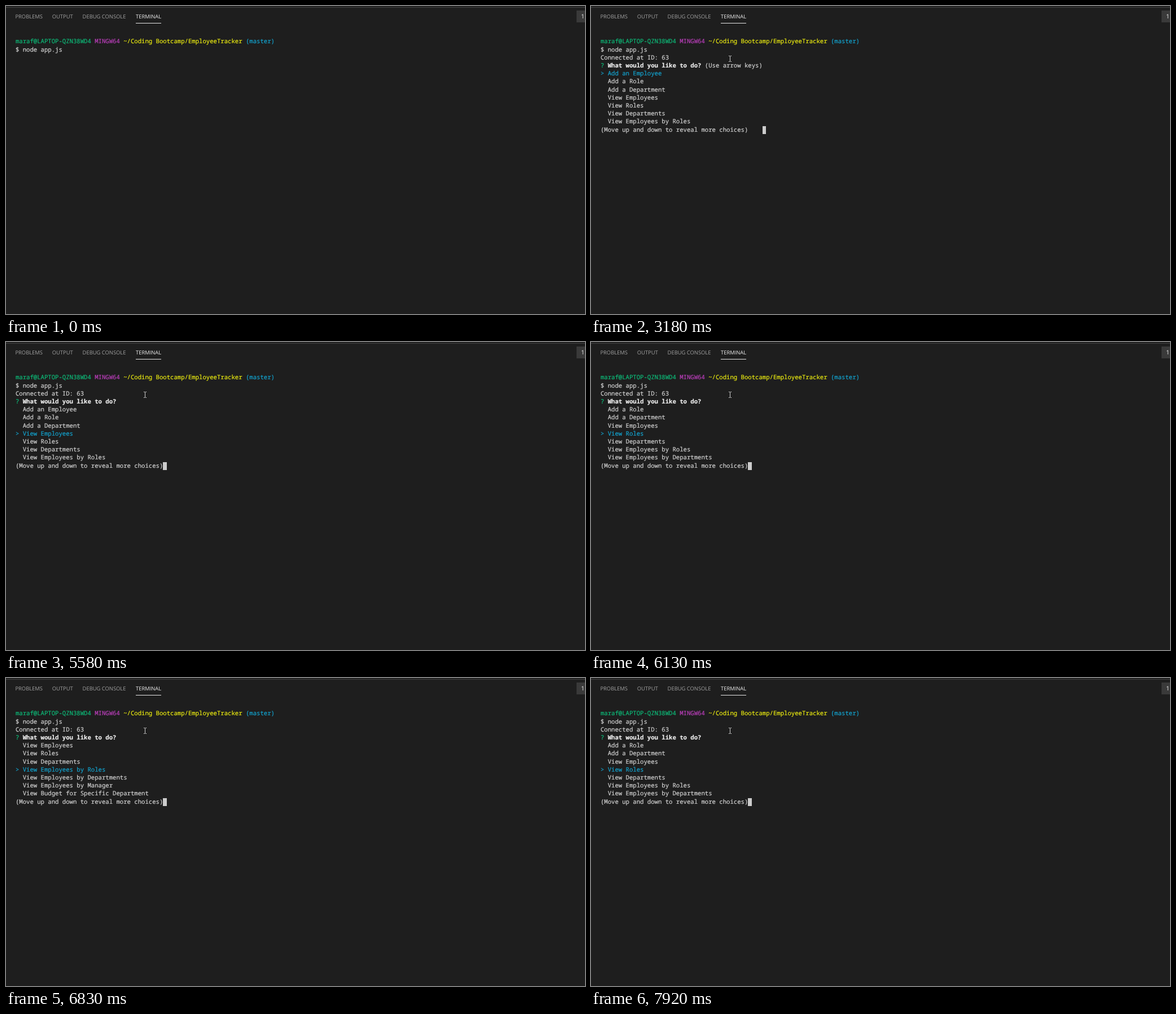
An HTML page that plays this animation: 1026x546 px, repeating every 8 s.

```html
<!DOCTYPE html>
<html lang="en">
<head>
<meta charset="utf-8">
<title>Terminal menu</title>
<style>
  html, body { margin: 0; width: 100%; height: 100%; overflow: hidden; background: #1e1e1e; }
  body { position: relative; text-rendering: geometricPrecision; }
  body > * { position: absolute; }
  .rule { left: 0; top: 2px; width: 100%; height: 1px; background: #434343; }
  .tab { top: 12px; height: 18px; line-height: 13px; white-space: nowrap; color: #a2a2a2;
    font-family: "Open Sans", "Noto Sans", sans-serif; font-size: 9.4px; }
  .active { color: #efefef; }
  .active::after { content: ""; position: absolute; left: 0; top: 18px; width: 100%; height: 1px; background: #e7e7e7; }
  .picker { left: 1011px; top: 8px; width: 15px; height: 21px; box-sizing: border-box; padding-left: 8px;
    background: #3a3a3a; color: #f0f0f0; font: 10.5px/22px "Open Sans", "Noto Sans", sans-serif; overflow: hidden; }
  pre { left: 17px; top: 56.45px; margin: 0; color: #d2d2d2; -webkit-text-stroke: .2px;
    font: 10.63px/14.18px "Noto Sans Mono", "DejaVu Sans Mono", monospace; font-variant-ligatures: none; }
  b { color: #ececec; }
  .green { color: #0dbc79; }
  .magenta { color: #bc3fbc; }
  .yellow { color: #ecec10; }
  .cyan { color: #13a4d0; }
  #block { top: 213px; width: 6.4px; height: 14px; background: #ccc; }
  #pointer { left: 0; top: 0; }
</style>
</head>
<body>
<div class="rule"></div>
<div class="tab" style="left:16.4px">PROBLEMS</div>
<div class="tab" style="left:81.7px">OUTPUT</div>
<div class="tab" style="left:135.6px">DEBUG CONSOLE</div>
<div class="tab active" style="left:230px">TERMINAL</div>
<div class="picker">1</div>
<pre><span class="green">maraf@LAPTOP-QZN38WD4</span> <span class="magenta">MINGW64</span> <span class="yellow">~/Coding Bootcamp/EmployeeTracker</span> <span class="cyan">(master)</span>
$ node app.js
<span id="menu"></span></pre>
<div id="block"></div>
<svg id="pointer" width="5" height="11"><path d="M0 .5h2M3 .5h2M2.5 1v9M0 10.5h2M3 10.5h2" stroke="#d0d0d0" fill="none"/></svg>
<script>
const LOOP = 8000, VISIBLE = 7, COLUMN = 6.378;
const choices = [
  'Add an Employee', 'Add a Role', 'Add a Department',
  'View Employees', 'View Roles', 'View Departments',
  'View Employees by Roles', 'View Employees by Departments',
  'View Employees by Manager', 'View Budget for Specific Department'
];
// [start ms, selected choice]
const selections = [[3180, 0], [5430, 2], [5580, 3], [6130, 4], [6450, 5], [6830, 6], [7690, 5], [7920, 4]];
// [start ms, left, top]
const moves = [[230, 868, 495], [300, 583, 380], [550, 248, 95], [1010, 244, 88]];

const [menu, block, pointer] = ['menu', 'block', 'pointer'].map(id => document.getElementById(id));
const latest = (steps, t) => steps.findLast(step => step[0] <= t);
const paint = (color, text) => `<span class="${color}">${text}</span>`;

function menuText(selected) {
  const first = Math.max(0, selected - 3);
  const rows = choices.slice(first, first + VISIBLE).map((choice, i) =>
    first + i === selected ? paint('cyan', '&gt; ' + choice) : '  ' + choice);
  const hint = selected ? '' : ' (Use arrow keys)';
  return ['Connected at ID: 63', paint('green', '?') + ' <b>What would you like to do?</b>' + hint,
    ...rows, '(Move up and down to reveal more choices)'].join('\n');
}

let shown;
function draw() {
  const t = performance.now() % LOOP;
  const move = latest(moves, t);
  pointer.style.display = move ? '' : 'none';
  if (move) pointer.style.transform = `translate(${move[1]}px, ${move[2]}px)`;

  const selected = latest(selections, t)?.[1] ?? -1;
  if (selected !== shown) {
    shown = selected;
    menu.innerHTML = selected < 0 ? '' : menuText(selected);
    block.style.display = selected < 0 ? 'none' : '';
    block.style.left = 17 + COLUMN * (selected ? 41 : 45) + 'px';
  }
  requestAnimationFrame(draw);
}
draw();
</script>
</body>
</html>
```
